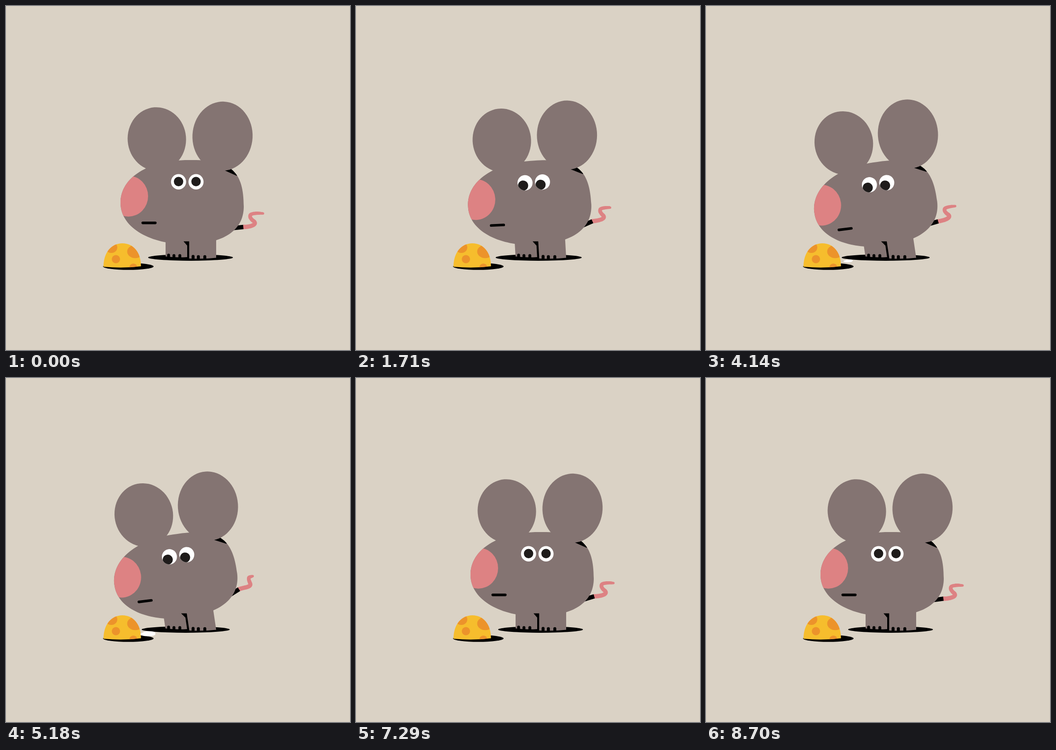
An HTML page with a canvas that plays this animation: 748x748 px, repeating every 8800 ms.

```html
<!DOCTYPE html>
<html lang="en">
<head>
<meta charset="utf-8">
<title>Mouse and cheese</title>
<style>
  html, body { margin: 0; width: 100%; height: 100%; overflow: hidden; background: #dad2c5; }
  canvas { display: block; width: 100vw; height: 100vh; }
</style>
</head>
<body>
<canvas id="stage" width="748" height="748"></canvas>
<script>
const ctx = document.getElementById('stage').getContext('2d');
const LOOP = 8800;
const GRAY = '#847472', PINK = '#dd8283', BLACK = '#000', PUPIL = '#1f1c1b';
const PIVOT = [418, 548];
const LEAN = -7 * Math.PI / 180;

const mix = (a, b, k) => a + (b - a) * k;
const clamp = v => Math.min(1, Math.max(0, v));
const span = (t, a, b) => clamp((t - a) / (b - a));
const ease = (t, a, b) => { const u = span(t, a, b); return u * u * (3 - 2 * u); };
const wave = turns => 0.5 - 0.5 * Math.cos(turns * 2 * Math.PI);

// Tail wag: time in ms against number of completed swings
const SWINGS = [[0, 0], [1710, 4.3], [2620, 6.68], [4140, 10.9],
                [5880, 15.48], [7290, 19.24], [8700, 22.93], [8800, 22.95]];
function swings(t) {
  let i = 1;
  while (i < SWINGS.length - 1 && t > SWINGS[i][0]) i++;
  const [t0, s0] = SWINGS[i - 1], [t1, s1] = SWINGS[i];
  return mix(s0, s1, span(t, t0, t1));
}

function oval(x, y, rx, ry, color, rot = 0) {
  ctx.fillStyle = color;
  ctx.beginPath();
  ctx.ellipse(x, y, rx, ry, rot, 0, Math.PI * 2);
  ctx.fill();
}

function fill(path, color) {
  ctx.fillStyle = color;
  ctx.fill(path);
}

function line(x0, y0, x1, y1, width, cap) {
  ctx.strokeStyle = BLACK;
  ctx.lineWidth = width;
  ctx.lineCap = cap;
  ctx.beginPath();
  ctx.moveTo(x0, y0);
  ctx.lineTo(x1, y1);
  ctx.stroke();
}

function clipped(path, draw) {
  ctx.save();
  ctx.clip(path);
  draw();
  ctx.restore();
}

const BODY = new Path2D('M249 428C249 372 311 335 397 335C490 333 517 360 517 436' +
  'C517 480 485 518 390 518C320 518 249 485 249 428Z');
const EAR_SHADE = new Path2D('M470 355L501 369L516 366L494 340Z');
const CHEESE = new Path2D('M212 567C212 535 230 516 253 516C277 516 293.5 536 293.5 566Q255 571 212 567Z');

function drawCheese() {
  oval(266, 566.3, 55, 7.5, BLACK);
  fill(CHEESE, '#f6bd2d');
  clipped(CHEESE, () => {
    const spot = '#ec932b';
    oval(239, 550.5, 9, 9, spot);
    oval(229, 525, 13, 12, spot);
    oval(281, 534, 17.5, 14.3, spot);
    oval(277, 569, 9, 9, spot);
  });
}

// Tail curve relative to its joint: relaxed and raised
const RELAXED = [[0, 0], [12, .5], [32, -4.5], [23, -12.5], [15, -17.5], [8, -28.5],
                 [25, -29.5], [33, -30.5], [39, -29.5], [43, -29.5]];
const RAISED = [[0, 0], [14, -3], [28.5, -1], [25.5, -10], [23.5, -17], [22.5, -23],
                [27, -23.5], [30, -24], [32, -24.5], [33, -24.5]];

function cubic(a, b, c, d, u) {
  const v = 1 - u;
  return v * v * v * a + 3 * v * v * u * b + 3 * v * u * u * c + u * u * u * d;
}

function drawTail(t, p) {
  const s = swings(t), lift = wave(s), curl = ease(wave(s - 0.09), 0, 1);
  const jx = mix(516, 520, lift) - 2.5 * p, jy = mix(480.5, 468.5, lift);
  const pts = RELAXED.map((q, i) => [jx + mix(q[0], RAISED[i][0], curl), jy + mix(q[1], RAISED[i][1], curl)]);
  const steps = 40;
  ctx.fillStyle = PINK;
  ctx.beginPath();
  for (let seg = 0; seg < 3; seg++) {
    const [a, b, c, d] = pts.slice(seg * 3, seg * 3 + 4);
    for (let i = 0; i <= steps; i++) {
      const u = i / steps;
      const x = cubic(a[0], b[0], c[0], d[0], u), y = cubic(a[1], b[1], c[1], d[1], u);
      const r = mix(4.7, 2.6, ((seg + u) / 3) ** 1.7);
      ctx.moveTo(x + r, y);
      ctx.arc(x, y, r, 0, Math.PI * 2);
    }
  }
  ctx.fill();
  line(490, 483.3, jx, jy, 9.4, 'butt');
}

function drawLegs(p) {
  ctx.save();
  // Shear above the soles so the feet stay planted
  const k = 0.15 * p;
  ctx.transform(1, 0, k, 1, -k * 547, 0);
  fill(new Path2D('M347 500H457V547.5Q430 550.5 398 549L394 546Q370 547.5 347 544.5Z'), GRAY);
  fill(new Path2D('M386 511.7H398.3V549H394V521Z'), BLACK);
  ctx.restore();
  for (const [x, y] of [[353.5, 541.5], [365.2, 542.5], [378, 542.5]]) line(x, y, x, 547, 6.2, 'round');
  for (const [x, y] of [[406.8, 544.5], [418.3, 545], [432.3, 545]]) line(x, y, x, 549, 6.4, 'round');
}

function drawEye(x, y, open, look) {
  if (open < 0.02) return;
  ctx.save();
  ctx.translate(x, y);
  ctx.scale(1, open);
  oval(0, 0, 16.4, 16.7, '#fff');
  const white = new Path2D();
  white.ellipse(0, 0, 16.4, 16.7, 0, 0, Math.PI * 2);
  const r = mix(10.2, 11, look);
  clipped(white, () => oval(-4.4 * look, -0.5 + 6.3 * look, r, r, PUPIL));
  ctx.restore();
}

function drawDrool(t) {
  if (t < 2890 || t > 5790) return;
  const grow = ease(t, 2900, 3840), fall = span(t, 3850, 4080);
  if (fall < 1) {
    const y = mix(486, 492.5, grow) + 62 * fall * fall, r = 5 * grow;
    ctx.fillStyle = '#fff';
    ctx.beginPath();
    ctx.moveTo(309, y - r * 1.7);
    ctx.bezierCurveTo(309 + r * .4, y - r, 309 + r, y - r * .5, 309 + r, y);
    ctx.arc(309, y, r, 0, Math.PI);
    ctx.bezierCurveTo(309 - r, y - r * .5, 309 - r * .4, y - r, 309, y - r * 1.7);
    ctx.fill();
    return;
  }
  const size = mix(0.45, 1, ease(t, 4050, 4330)) * (1 - ease(t, 5150, 5790));
  const y = mix(554.3, 556, span(t, 4140, 4330));
  oval(311, y - 1.2 * size, 14 * size, 4.4 * size, '#fff');
  oval(308.5, y + 1 * size, 16.5 * size, 4.6 * size, '#fff');
}

function draw(t) {
  const p = ease(t, 1610, 1850) - ease(t, 5705, 5995);
  const look = ease(t, 1550, 1690) - ease(t, 5690, 5860);
  const open = 1 - ease(t, 7420, 7540) + ease(t, 7545, 7670);

  ctx.fillStyle = '#dad2c5';
  ctx.fillRect(0, 0, 748, 748);
  const left = 309 - 14 * p, right = 493.5 - 7 * p;
  oval((left + right) / 2, 546.9, (right - left) / 2, 7, BLACK);
  drawCheese();

  ctx.save();
  ctx.translate(...PIVOT);
  ctx.rotate(LEAN * p);
  ctx.translate(-PIVOT[0], -PIVOT[1]);
  drawTail(t, p);
  fill(BODY, GRAY);
  clipped(BODY, () => {
    fill(EAR_SHADE, BLACK);
    oval(266, 413.5, 43, 44.5, PINK);
  });
  oval(328 + 3 * p, 289.3 - 4 * p, 63.5, 69.2, GRAY, -0.08);
  oval(470.8 + p, 283, 65.4, 75.2, GRAY, 0.05);
  drawEye(375.2, 382.3, open, look);
  drawEye(413.2, 382.3, open, look);
  line(297.3, 471.6, 324.7, 471.6, 5.6, 'round');
  ctx.restore();

  drawLegs(p);
  drawDrool(t);
}

function tick() {
  draw(performance.now() % LOOP);
  requestAnimationFrame(tick);
}
tick();
</script>
</body>
</html>
```
